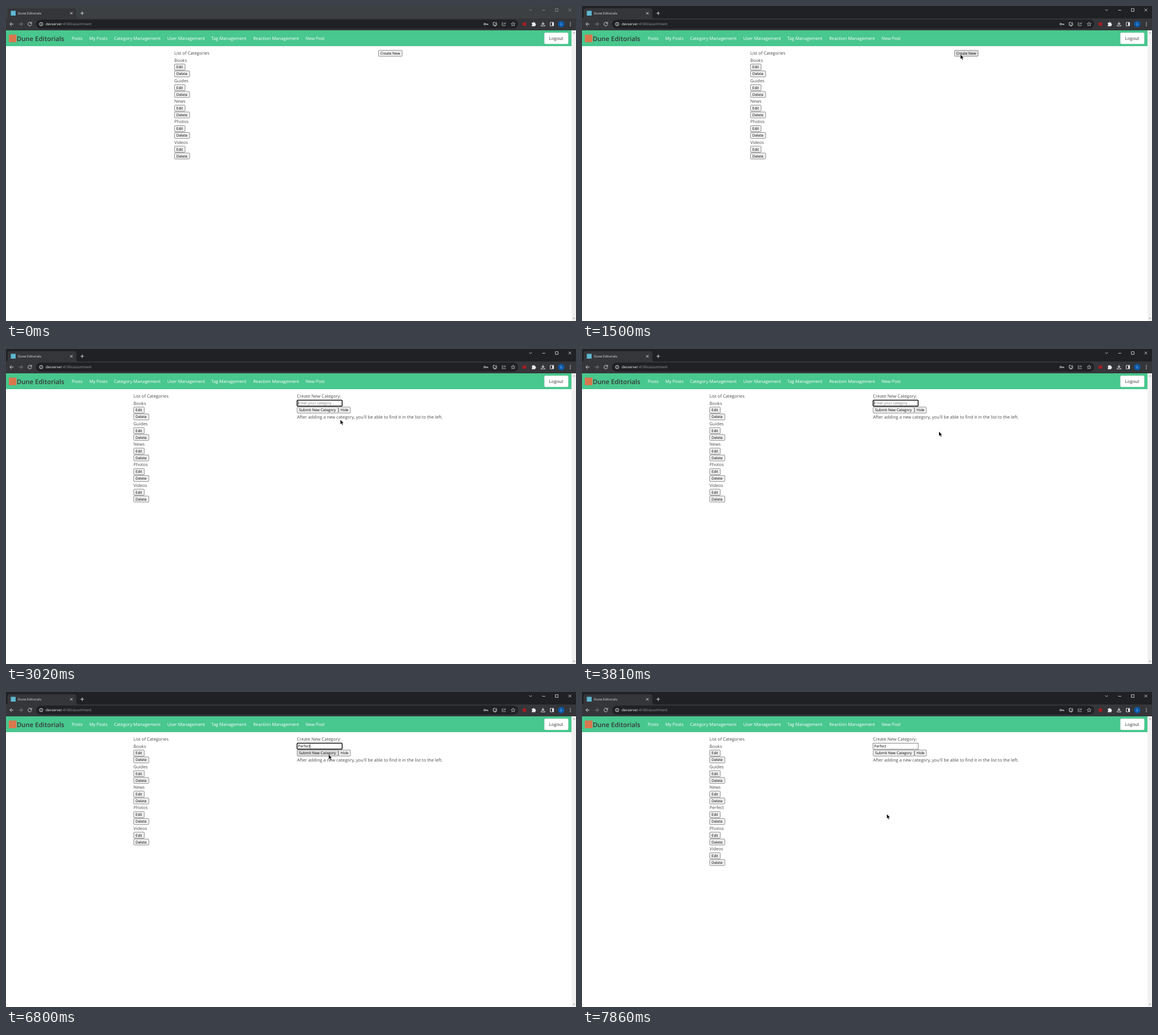
An HTML page for the animation above (8 s loop, 1006 by 557 pixels).

```html
<!DOCTYPE html>
<html lang="en">
<head>
<meta charset="utf-8">
<title>Category manager</title>
<style>
html, body { margin: 0; width: 100%; height: 100%; overflow: hidden; background: #fff; }
svg { display: block; --strip: #202124; --controls: #e8eaed; }
svg.idle { --strip: #3c4043; --controls: #929497; }
text { font: 7.72px "Open Sans", "Noto Sans", sans-serif; fill: #4a4a4a; text-rendering: geometricPrecision; white-space: pre; }
.small { font-size: 6.45px; fill: #000; }
.hint { fill: #757575; }
.nav { fill: #fff; }
.brand { font-size: 11.4px; font-weight: 600; fill: #363636; }
.tab { font-size: 5.8px; fill: #e3e5e8; }
.url { font-size: 6.3px; fill: #9aa0a6; }
.url tspan { fill: #fff; }
.line { fill: none; stroke: #d5d7da; stroke-width: 1; }
.controls { fill: none; stroke: var(--controls); stroke-width: .8; }
</style>
</head>
<body>
<svg width="1006" height="557" viewBox="0 0 1006 557">
  <rect width="1006" height="22" fill="var(--strip)"/>
  <path d="M-1 22Q3 22 3 18V8Q3 4 7 4H120Q124 4 124 8V18Q124 22 128 22Z" fill="#35363a"/>
  <rect x="8.5" y="8.5" width="8.5" height="8.5" fill="#5fb8d2"/>
  <text x="21" y="15" class="tab">Dune Editorials</text>
  <path class="line" d="M113.3 10.8l4.2 4.2m0-4.2l-4.2 4.2M131.5 12.8h6m-3-3v6"/>
  <path class="controls" d="M923.5 6l2.3 2.3L928.1 6M946.5 7.5h5M969.6 4.7h4.8v4.8h-4.8zM992.8 4.7l4.8 4.8m0-4.8l-4.8 4.8"/>

  <rect y="22" width="1006" height="21" fill="#35363a"/>
  <rect x="53" y="24" width="851" height="16" rx="8" fill="#202124"/>
  <path class="line" d="M13.3 32H6.8m3.2-3.2L6.8 32l3.2 3.2"/>
  <path class="line" style="stroke:#85878a" d="M22.8 32h6.5m-3.2-3.2l3.2 3.2-3.2 3.2"/>
  <path class="line" d="M44.4 29.8a3.2 3.2 0 1 0 .8 2.6M45.2 28.3v2.6h-2.6"/>
  <g class="line" stroke-width=".8">
    <circle cx="62" cy="32" r="3"/>
    <path d="M62 31.5v2.2M62 29.8v.8"/>
  </g>
  <text x="70" y="34.2" class="url"><tspan>devserver</tspan>:4100/assortment</text>
  <g class="line">
    <circle cx="844.8" cy="32" r="1.5"/>
    <path d="M846.4 32h4.2v1.6M848.6 32v1.6"/>
    <path d="M863 29h-3v5h6v-2M861.5 35.3h3M865 28.5v3.2m-1.4-1.4l1.4 1.4 1.4-1.4"/>
    <path d="M878 29.8h-2.3v5h5.6v-1.5M877.6 33q.3-2.5 4-2.5m-1.5-1.7l1.7 1.7-1.7 1.7" stroke="#9a9c9f"/>
    <path d="M895 28.5l1 2.4 2.6.2-2 1.6.7 2.5-2.3-1.4-2.3 1.4.7-2.5-2-1.6 2.6-.2z" style="stroke-width:.7"/>
    <path d="M947.7 28v5m-2.3-2.3l2.3 2.3 2.3-2.3M944.5 33.5v1.8h6.4v-1.8" style="stroke-width:1.1"/>
    <path d="M960.5 29h6v6h-6z"/>
  </g>
  <circle cx="915" cy="32" r="3.3" fill="#a51d24"/>
  <path d="M928 29.6h2a1.2 1.2 0 0 1 2.4 0h1.8v1.9a1.2 1.2 0 0 1 0 2.4v1.8H928v-1.9a1.2 1.2 0 0 0 0-2.3z" fill="#e8eaed"/>
  <path d="M964 29h2.5v6H964z" fill="#e8eaed"/>
  <circle cx="980" cy="32" r="5.5" fill="#0b5cad"/>
  <text x="978.5" y="34.1" style="font-size:6px;fill:#dce8f5">L</text>
  <g fill="#e8eaed">
    <circle cx="996" cy="29.2" r=".8"/><circle cx="996" cy="32" r=".8"/><circle cx="996" cy="34.8" r=".8"/>
  </g>

  <rect y="43" width="998" height="28" fill="#48c78e"/>
  <rect x="5" y="50.5" width="13.5" height="13.5" fill="#d9774f"/>
  <text x="19" y="62" class="brand">Dune Editorials</text>
  <g id="nav"></g>
  <rect x="950.2" y="47.3" width="42" height="19.7" rx="2" fill="#fff" stroke="#dbdbdb" stroke-width=".5"/>
  <text x="958.5" y="60" style="fill:#363636">Logout</text>
  <rect x="998" y="43" width="8" height="514" fill="#f1f1f1"/>
  <path d="M1000.5 48.5l2-2.2 2 2.2zM1000.5 551.5l2 2.2 2-2.2z" fill="#a3a3a3"/>

  <g id="page"></g>
  <g id="cursor">
    <path id="arrow" d="M0 0V8L1.9 6.3 3.3 9.3 4.6 8.7 3.2 5.8H5.7Z" stroke="#fff" stroke-width=".3"/>
    <path id="beam" d="M-1.6-4H1.6M0-4V4M-1.6 4H1.6" fill="none" stroke="#000" stroke-width=".8"/>
  </g>
</svg>
<script>
const LOOP = 8000, ROW = 12.1, FORM_X = 513.5;
const CLICK = 1500, FORM = 1570, FOCUS = 2680, BLUR = 7190, ADDED = 7260;

// Pointer stops: time, x, y
const PATH = [
  [500, 811, 510], [640, 690, 420], [780, 560, 300], [1000, 605, 165], [1300, 668, 86],
  [1760, 668, 86], [2000, 570, 93], [2100, 517, 97], [2220, 540, 97],
  [2680, 540, 97], [2880, 565, 112], [3020, 590, 125], [3280, 630, 146],
  [6400, 630, 146], [6800, 569.5, 111], [7660, 569.5, 111], [7860, 538, 216]
];
// Typed characters shown from each time on
const TYPED = [[4470, 2], [4740, 3], [4940, 4], [5140, 5], [5340, 6], [5470, 7]];
// Times at which the caret switches on and off
const BLINK = [2680, 3280, 3810, 4340, 4470, 5940, 6470, 7000];

const $ = id => document.getElementById(id);
const svg = document.querySelector("svg");
const inside = (p, x, y, w, h) => p.x >= x && p.x <= x + w && p.y >= y && p.y <= y + h;
const label = (x, y, s, cls = "") => `<text x="${x}" y="${y}" class="${cls}">${s}</text>`;

function button(x, cy, w, s, p) {
  const fill = inside(p, x, cy - 5.6, w, 11.2) ? "#dedede" : "#efefef";
  return `<rect x="${x + .4}" y="${cy - 5.3}" width="${w - .8}" height="10.7" rx="1.3" fill="${fill}" stroke="#767676" stroke-width=".8"/>`
    + label(x + 3.8, cy + 2.4, s, "small");
}

function pointer(t) {
  const i = PATH.findIndex(k => k[0] > t);
  if (i < 1) {
    const [, x, y] = PATH[i ? PATH.length - 1 : 0];
    return { x, y };
  }
  const [t0, x0, y0] = PATH[i - 1], [t1, x1, y1] = PATH[i], u = (t - t0) / (t1 - t0);
  return { x: x0 + (x1 - x0) * u, y: y0 + (y1 - y0) * u };
}

function list(x, names, p) {
  return label(x, 86.4, "List of Categories") + names.map((name, i) => {
    const y = 95.8 + i * 3 * ROW;
    return label(x, y + 2.7, name) + button(x, y + ROW, 19.5, "Edit", p)
      + button(x, y + 2 * ROW, 27.5, "Delete", p);
  }).join("");
}

function form(t, p) {
  const focused = t >= FOCUS && t < BLUR;
  const count = TYPED.reduce((n, [at, c]) => t >= at ? c : n, 0);
  const caretOn = focused && BLINK.filter(at => t >= at).length % 2;
  const border = focused ? 'rx="1.3" stroke="#101010" stroke-width="1.5"' : 'stroke="#767676" stroke-width=".9"';
  const value = "Perfect".slice(0, count);
  const caretX = 515.8 + [0, 0, 7.3, 9.8, 12, 15.5, 18.5, 20.9][count];
  return label(FORM_X, 86.4, "Create New Category:")
    + `<rect x="513.7" y="90.6" width="79.6" height="10.5" fill="#fff" ${border}/>`
    + (count ? label(515.6, 98.2, value, "small") : label(515.6, 98.2, "Enter your category", "small hint"))
    + (caretOn ? `<path d="M${caretX} 92v7.6" stroke="#000" stroke-width=".6"/>` : "")
    + button(FORM_X, 107.9, 73.2, "Submit New Category", p)
    + button(586.7, 107.9, 21.6, "Hide", p)
    + label(FORM_X, 122.6, "After adding a new category, you'll be able to find it in the list to the left.");
}

let shown = "";
function frame(now) {
  const t = now % LOOP, p = pointer(t), open = t >= FORM;
  svg.classList.toggle("idle", t < CLICK);

  const names = ["Books", "Guides", "News", "Photos", "Videos"];
  if (t >= ADDED) names.splice(3, 0, "Perfect");
  const html = list(open ? 225 : 297, names, p)
    + (open ? form(t, p) : button(657, 83.6, 42.6, "Create New", p));
  if (html !== shown) $("page").innerHTML = shown = html;

  const overText = open && (inside(p, 513, 90, 81, 11.5) || inside(p, 513, 115, 259, 10));
  $("cursor").setAttribute("transform", `translate(${p.x} ${p.y})`);
  $("cursor").style.display = t < 500 ? "none" : "";
  $("arrow").style.display = overText ? "none" : "";
  $("beam").style.display = overText ? "" : "none";
  requestAnimationFrame(frame);
}

$("nav").innerHTML = [
  [116, "Posts"], [147, "My Posts"], [190.7, "Category Management"], [284.7, "User Management"],
  [362.3, "Tag Management"], [436.3, "Reaction Management"], [528.8, "New Post"]
].map(([x, s]) => label(x, 60, s, "nav")).join("");
requestAnimationFrame(frame);
</script>
</body>
</html>
```
